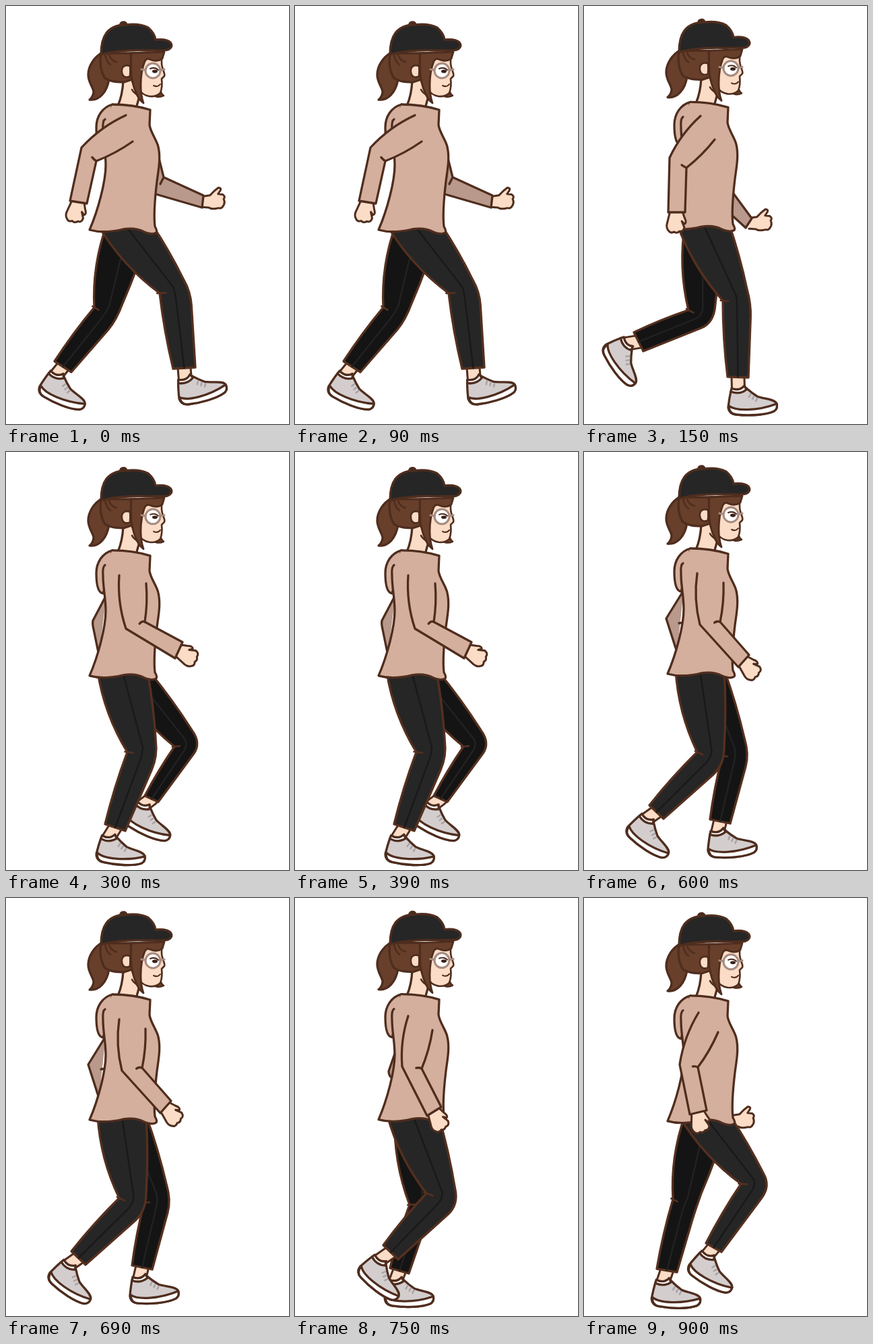
An HTML page with a canvas that plays this animation: 420x620 px, repeating every 1050 ms.

```html
<!DOCTYPE html>
<html lang="en">
<head>
<meta charset="utf-8">
<title>Walk cycle</title>
<style>
html, body { margin: 0; width: 100%; height: 100%; overflow: hidden; background: #fff; }
canvas { display: block; }
</style>
</head>
<body>
<canvas id="stage" width="420" height="620"></canvas>
<script>
const ctx = document.getElementById('stage').getContext('2d');
const STEP = 150;
const INK = '#4f2d1e', SKIN = '#fbdcc6', SHIRT = '#d4af9d', SHIRT_FAR = '#b8998b';
const HAIR = '#673f2b', CAP = '#262626', FRAME = '#a68b80';
const NEAR = { fill: '#262626', seam: '#191919' };
const FAR = { fill: '#141414', seam: '#222222' };

// Vertical bob of head and torso in each pose.
const BOB = [0, -3.6, -.2, .8, -3, -3.4, -1.2];

// Back hip x, front hip x, knee back, hem back, hem front, knee front, shoe x, y, degrees.
const NEAR_LEGS = [
  [137, 218, 228, 426, 248, 538, 281, 536, 274, 424, 266, 555, -13],
  [138, 215, 206, 437, 213, 550, 244, 551, 248, 442, 229, 570, 0],
  [136, 210, 180, 445, 147, 552, 177, 562, 225, 451, 152, 573, 7],
  [135, 206, 154, 448, 91, 545, 114, 558, 191, 469, 90, 564, 21],
  [136, 208, 168, 445, 97, 524, 118, 544, 208, 464, 92, 545, 37],
  [137, 213, 195, 438, 131, 515, 153, 536, 243, 455, 124, 538, 41],
  [142, 218, 233, 424, 181, 512, 204, 525, 277, 427, 182, 531, 32]
];
const FAR_LEGS = [
  [149, 215, 131, 447, 72, 527, 97, 543, 164, 466, 74, 548, 25],
  [150, 203, 155, 451, 74, 484, 88, 512, 193, 470, 62, 501, 57],
  [158, 213, 250, 437, 206, 510, 226, 519, 290, 432, 202, 525, 27],
  [148, 213, 244, 441, 251, 537, 284, 536, 279, 430, 268, 552, -17],
  [150, 208, 205, 452, 187, 545, 217, 551, 245, 448, 198, 565, -2],
  [148, 205, 170, 455, 141, 549, 169, 557, 205, 452, 149, 569, 2],
  [149, 215, 132, 447, 108, 550, 138, 555, 165, 463, 117, 570, 4]
];

// Shoulder top, outer elbow, cuff back, cuff front, inner elbow, armpit.
const NEAR_ARMS = [
  [178, 162, 112, 210, 95, 289, 120, 293, 134, 230, 188, 201],
  [173, 163, 127, 225, 125, 306, 150, 306, 152, 240, 194, 198],
  [168, 183, 178, 262, 251, 306, 262, 282, 206, 252, 208, 195],
  [170, 191, 203, 264, 283, 291, 289, 265, 228, 247, 211, 190],
  [168, 180, 172, 256, 229, 319, 245, 301, 202, 252, 207, 194],
  [168, 175, 159, 250, 196, 323, 217, 310, 188, 253, 204, 196],
  [170, 170, 142, 247, 157, 321, 182, 315, 169, 251, 199, 199]
];
const FAR_ARMS = [
  { sleeve: 'M226 222 L234 254 L293 281 L291 299 L222 279 M229 264 L234 254', hand: [291, 290, 15] },
  { sleeve: 'M221 277 L249 315 L240 329 L218 309', hand: [245, 322, 15] },
  { sleeve: 'M149 212 L129 250 Q128 255 130 263 L138 302' },
  { sleeve: 'M142 195 L106 219 Q102 223 101 230 L94 299 L112 297 L127 236 L150 228 M118 234 L127 236', hand: [101, 299, 88] },
  { sleeve: 'M148 205 L122 247 L138 297 M141 254 L147 253' },
  { sleeve: 'M149 228 L139 257 Q139 265 146 268' },
  { sleeve: '', hand: [219, 330, 15] }
];

const HAND = 'M0 -9 L8 -12 Q15 -16 17 -12 L13 -8 L22 -12 Q29 -11 28 -5 Q32 -1 29 3 Q32 8 28 11 Q24 15 18 14 L0 10';
const THUMB_HAND = 'M0 -8 L9 -12 Q13 -20 18 -26 Q23 -27 22 -23 L20 -17 L27 -18 Q32 -16 30 -12 Q34 -7 32 -2 Q31 3 26 3 Q18 8 12 6 L2 8';

function shape(d, fill, stroke = INK, width = 3.3) {
  const path = new Path2D(d);
  if (fill) { ctx.fillStyle = fill; ctx.fill(path); }
  if (stroke) { ctx.strokeStyle = stroke; ctx.lineWidth = width; ctx.stroke(path); }
}
const line = (d, stroke = INK, width = 3.3) => shape(d, null, stroke, width);

function at(x, y, degrees, draw) {
  ctx.save();
  ctx.translate(x, y);
  ctx.rotate(degrees * Math.PI / 180);
  draw();
  ctx.restore();
}

const mix = (a, b, t) => [a[0] + (b[0] - a[0]) * t, a[1] + (b[1] - a[1]) * t];
const pairs = list => Array.from({ length: list.length / 2 }, (_, i) => list.slice(2 * i, 2 * i + 2));

// Curve from a to b that bows sideways by a share of its length.
function bow(a, b, amount) {
  const [x, y] = mix(a, b, .5);
  return `Q${x - (b[1] - a[1]) * amount} ${y + (b[0] - a[0]) * amount} ${b} `;
}

function shoe() {
  shape('M-11 1 C-13 10 -14 17 -15 25 Q-14 35 -3 36 C15 38 40 37 53 31 Q59 27 57 20 C55 13 38 13 28 9 Q20 4 11 -4 Q4 5 -11 1Z', '#d3cdce');
  shape('M-14 23 C-4 31 28 31 57 20 Q59 27 53 31 C40 37 15 38 -3 36 Q-14 35 -14 23Z', '#fff');
  shape('M-10 -3 Q2 2 9 -7 L12 -1 Q2 7 -11 2Z', '#fff');
  line('M18 6 l-2 4 M23 9 l-2 4 M28 12 l-2 4', '#aaa3a4', 2.5);
}

function leg([backX, frontX, ...rest], { fill, seam }, bob) {
  const [kneeBack, hemBack, hemFront, kneeFront] = pairs(rest.slice(0, 8));
  const [x, y, angle] = rest.slice(8);
  const hipBack = [backX, 326 + bob], hipFront = [frontX, 326 + bob];
  const hem = mix(hemBack, hemFront, .5), knee = mix(kneeBack, kneeFront, .5);
  const ankle = `M${hem} L${x} ${y}`;
  line(ankle, INK, 22);
  line(ankle, SKIN, 16);
  at(x, y, angle, shoe);
  shape(`M${hipBack} ${bow(hipBack, kneeBack, .1)}` + bow(kneeBack, hemBack, .03) +
    `L${hemFront} L${mix(kneeFront, hemFront, .18)} ` +
    `Q${kneeFront} ${mix(kneeFront, hipFront, .18)} ` +
    bow(mix(kneeFront, hipFront, .18), hipFront, .03), fill, '#56301f');
  line(`M${mix(hipBack, hipFront, .5)} L${mix(knee, hipFront, .08)} Q${knee} ${mix(knee, hem, .1)} L${hem}`, seam, 2.4);
  line(`M${mix(kneeBack, kneeFront, -.08)} L${mix(kneeBack, kneeFront, .2)}`, '#56301f', 2.6);
}

function nearArm(points) {
  const [top, elbow, cuffBack, cuffFront, inner, pit] = pairs(points);
  const cuff = mix(cuffBack, cuffFront, .5), joint = mix(elbow, inner, .5);
  const angle = Math.atan2(cuff[1] - joint[1], cuff[0] - joint[0]) * 180 / Math.PI;
  at(...cuff, angle, () => shape(HAND, SKIN, INK, 3));
  shape(`M${top} ${bow(top, elbow, .1)}L${cuffBack} L${cuffFront} L${inner} ${bow(inner, pit, .06)}`, SHIRT);
  const crease = mix(inner, elbow, .28);
  line(`M${inner} Q${mix(inner, elbow, .15)[0]} ${inner[1] - 2} ${crease[0]} ${crease[1]}`);
}

function farArm({ sleeve, hand }) {
  if (hand) at(...hand, () => shape(THUMB_HAND, SKIN, INK, 3));
  if (sleeve) shape(sleeve, SHIRT_FAR);
}

function shirt() {
  shape('M158 146 C143 150 134 164 134 180 C134 196 136 209 144 210 L150 190Z', SHIRT);
  shape('M158 146 Q188 146 214 154 L213 176 C214 187 224 199 226 209 C230 226 226 244 224 260 C221 285 219 310 221 327 Q225 334 223 336 Q218 340 205 335 Q192 328 174 331 Q145 338 124 332 C137 302 148 260 148 236 C148 214 143 195 144 176 L147 168Z', SHIRT, null);
  line('M147 168 Q143 170 144 184 C144 202 148 216 148 236 C148 260 137 302 124 332 Q145 338 174 331 Q192 328 205 335 Q218 340 223 336 Q225 334 221 327 C219 310 221 285 224 260 C226 244 230 226 226 209 C224 199 214 187 213 176 L214 154 Q188 146 158 146');
}

function head() {
  shape('M143 69 C130 76 122 90 122 102 C122 113 129 120 130 127 C130 132 127 137 124 139 C138 141 150 128 153 108Z', HAIR);
  shape('M141 70 C139 82 140 95 146 106 C152 112 163 113 175 113 L190 108 L196 70Z', HAIR);
  shape('M229 124 Q230 130 234 133 Q228 136 222 134Z', HAIR, INK, 2.5);
  shape('M188 72 L231 72 L231 84 C231 94 237 100 235 104 L231 108 C232 116 231 124 229 129 Q223 135 213 134 Q202 132 198 124 L187 106Z', SKIN, INK, 2.6);
  shape('M184 89 C176 86 171 91 172 98 C173 106 179 107 185 104Z', SKIN, INK, 2.6);
  shape('M185 70 L186 104 Q189 120 192 126 Q196 138 204 144 Q200 132 200 118 C200 104 202 92 206 82 Q209 77 213 79 Q224 84 232 78 L235 68Z', HAIR, INK, 2.8);
  line('M187 124 Q189 128 195 132 M147 72 Q149 83 155 87 M153 73 Q156 81 164 83 M186 72 L184 103', INK, 2.6);
  shape('M207 96 A11 11 0 1 0 229 96 A11 11 0 1 0 207 96Z', '#fff', FRAME, 3);
  line('M201 94 L207 95 M229 95 L235 94', FRAME, 3);
  line('M214 93 Q221 90 226 95', INK, 2);
  shape('M217 97 A4 2.4 0 1 0 225 97 A4 2.4 0 1 0 217 97Z', '#3a2118', null);
  line('M219 118 Q225 121 229 116', INK, 2);
  shape('M170 28 C169 23 179 22 179 28Z', CAP);
  shape('M141 72 C141 60 143 48 149 40 C156 31 166 28 177 28 C190 26 203 28 211 32 C218 38 221 44 222 50 C231 49 240 50 244 54 C248 59 245 63 240 65 C232 67 223 65 210 66 C185 65 160 67 141 72Z', CAP);
}

function drawPose(pose) {
  const bob = BOB[pose];
  ctx.fillStyle = '#fff';
  ctx.fillRect(0, 0, 420, 620);
  farArm(FAR_ARMS[pose]);
  leg(FAR_LEGS[pose], FAR, bob);
  leg(NEAR_LEGS[pose], NEAR, bob);
  at(0, bob, 0, () => {
    shape('M174 110 Q173 132 166 148 L193 152 L198 134 L186 108Z', SKIN);
    shirt();
    head();
  });
  nearArm(NEAR_ARMS[pose]);
}

ctx.lineJoin = 'round';
ctx.lineCap = 'round';
const start = performance.now();
function tick() {
  drawPose(Math.floor((performance.now() - start) / STEP) % BOB.length);
  requestAnimationFrame(tick);
}
tick();
</script>
</body>
</html>
```
